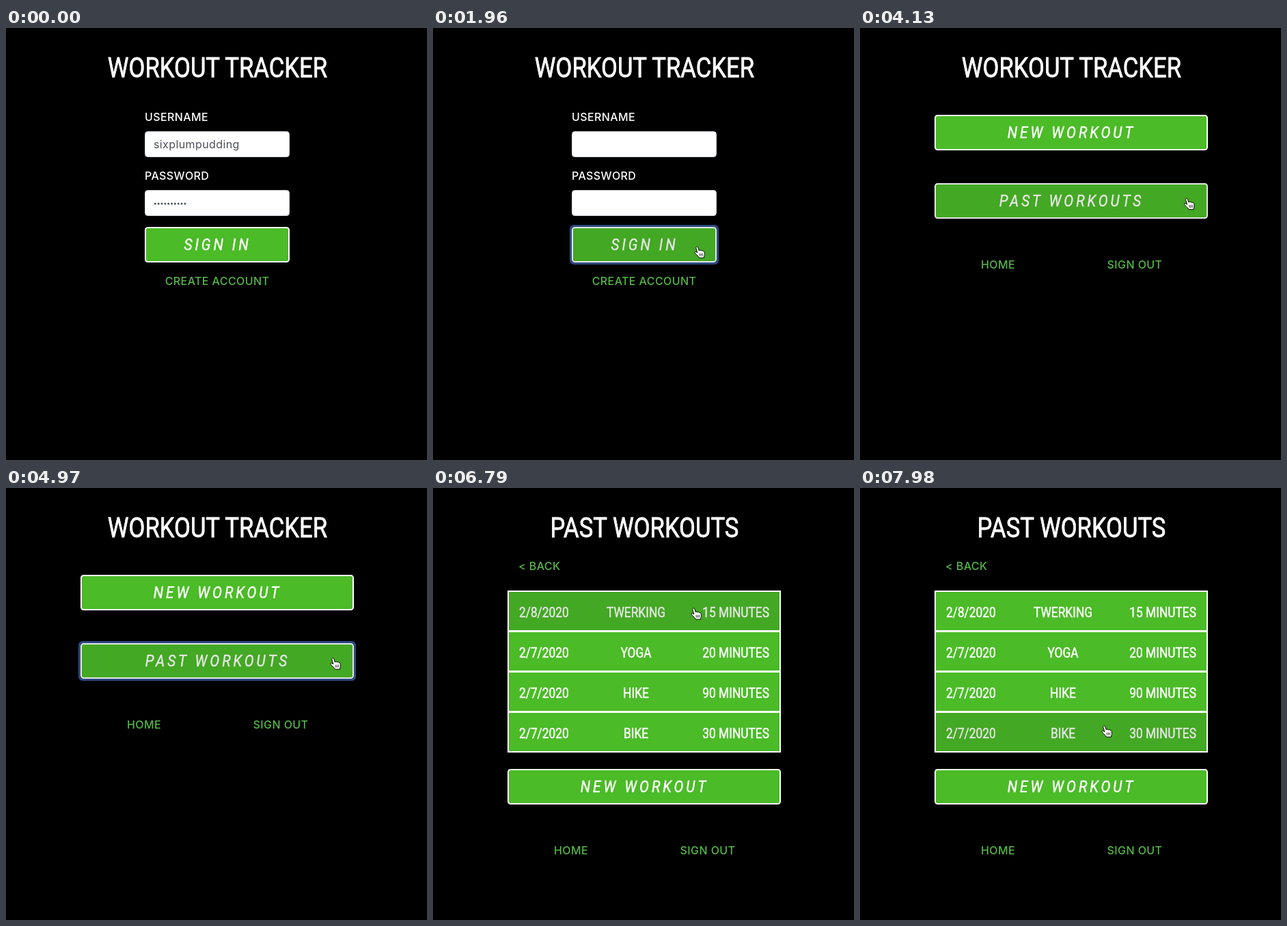
These frames come from a looping animation (616 px wide and 632 px high, 8000 ms). An HTML page:

```html
<!DOCTYPE html>
<html lang="en">
<head>
<meta charset="utf-8">
<title>Workout tracker</title>
<style>
  html, body { margin: 0; width: 100%; height: 100%; overflow: hidden; background: #000; }
  svg { display: block; width: 100vw; height: 100vh; }
  .cond { font-family: Roboto, sans-serif; fill: #fff; stroke: #fff; stroke-width: .5px; }
  .title { font-size: 40px; stroke-width: .8px; }
  .btn { font-size: 24px; font-style: italic; letter-spacing: 4.5px; }
  .cell { font-size: 20px; }
  .label, .link { font: 500 16px Inter, sans-serif; letter-spacing: .4px; }
  .label { fill: #fff; }
  .link { fill: #56b748; }
  .input { font: 16px Inter, sans-serif; fill: #495057; letter-spacing: .4px; }
</style>
</head>
<body>
<svg id="stage" viewBox="0 0 616 632" xmlns="http://www.w3.org/2000/svg"></svg>
<script>
const LOOP = 8000, STEP = 70;
const GREEN = '#4bbb27', RING = '#2d4b80';
const CLEAR = 1820, HOME = 2310, PAST = 5250;
const stage = document.getElementById('stage');

function el(parent, tag, attrs, text) {
  const node = document.createElementNS('http://www.w3.org/2000/svg', tag);
  for (const key in attrs) node.setAttribute(key, attrs[key]);
  if (text) node.textContent = text;
  parent.append(node);
  return node;
}

const show = (node, on) => node.setAttribute('visibility', on ? 'visible' : 'hidden');

function text(parent, cls, x, y, str, anchor = 'start') {
  return el(parent, 'text', { class: cls, x, y, 'text-anchor': anchor }, str);
}

// Roboto narrowed to the condensed proportions
function cond(parent, cls, x, y, str, anchor = 'middle') {
  return el(parent, 'text', {
    class: 'cond ' + cls, 'text-anchor': anchor,
    transform: `translate(${x} ${y}) scale(.867 1)`
  }, str);
}

function page(title) {
  const g = el(stage, 'g', {});
  cond(g, 'title', 309.5, 72, title);
  return { g, targets: [] };
}

function button(pg, x, y, w, str, clickAt = Infinity) {
  const ring = el(pg.g, 'rect', { x: x - 3, y: y - 3, width: w + 6, height: 58, rx: 6, fill: RING });
  el(pg.g, 'rect', { x, y, width: w, height: 52, rx: 4, fill: '#000' });
  const face = el(pg.g, 'g', {});
  el(face, 'rect', {
    x: x + 1, y: y + 1, width: w - 2, height: 50, rx: 3.5,
    fill: GREEN, stroke: '#fff', 'stroke-width': 2
  });
  cond(face, 'btn', x + w / 2 + .5, y + 33.6, str);
  pg.targets.push({ x, y, w, h: 52, face, ring, clickAt });
}

function links(pg, y) {
  text(pg.g, 'link', 202, y, 'HOME', 'middle');
  text(pg.g, 'link', 402, y, 'SIGN OUT', 'middle');
}

function field(pg, y, label) {
  text(pg.g, 'label', 203, y - 15, label);
  el(pg.g, 'rect', { x: 203.5, y: y + .5, width: 211, height: 37, rx: 4, fill: '#fff', stroke: '#ced4da' });
}

// Sign-in page
const login = page('WORKOUT TRACKER');
field(login, 151, 'USERNAME');
field(login, 237, 'PASSWORD');
const typed = el(login.g, 'g', {});
text(typed, 'input', 216, 176, 'sixplumpudding');
for (let i = 0; i < 10; i++) {
  el(typed, 'circle', { cx: 218.3 + i * 4.85, cy: 257, r: 1.5, fill: '#495057' });
}
button(login, 203, 291, 212, 'SIGN IN', 1610);
text(login.g, 'link', 309, 376, 'CREATE ACCOUNT', 'middle');

// Home page
const home = page('WORKOUT TRACKER');
button(home, 109, 127, 400, 'NEW WORKOUT');
button(home, 109, 227, 400, 'PAST WORKOUTS', 4550);
links(home, 352);

// List page
const past = page('PAST WORKOUTS');
text(past.g, 'link', 125, 120, '< BACK');
[
  ['2/8/2020', 'TWERKING', '15 MINUTES'],
  ['2/7/2020', 'YOGA', '20 MINUTES'],
  ['2/7/2020', 'HIKE', '90 MINUTES'],
  ['2/7/2020', 'BIKE', '30 MINUTES']
].forEach(([date, name, time], i) => {
  const y = 150 + i * 59;
  const face = el(past.g, 'g', {});
  el(face, 'rect', { x: 110, y: y + 1, width: 398, height: 59, fill: GREEN });
  cond(face, 'cell', 126, y + 39, date, 'start');
  cond(face, 'cell', 297, y + 39, name);
  cond(face, 'cell', 492, y + 39, time, 'end');
  past.targets.push({ x: 109, y, w: 400, h: 59, face });
});
el(past.g, 'path', {
  d: 'M110 151H508V386H110Z', fill: 'none', stroke: '#fff', 'stroke-width': 2
});
el(past.g, 'path', {
  d: 'M110 209.5H508M110 268.5H508M110 327.5H508', stroke: '#fff', 'stroke-width': 3
});
button(past, 109, 411, 400, 'NEW WORKOUT');
links(past, 536);

// Pointer, with its hot spot at 0,0
const pointer = el(stage, 'g', {});
const arrow = el(pointer, 'path', {
  d: 'M0 0V15.5L3.6 12.2L6 17.6L8.6 16.5L6.2 11.2H11Z',
  fill: '#000', stroke: '#fff', 'stroke-linejoin': 'round'
});
const hand = el(pointer, 'g', {
  transform: 'translate(-1.2 -.4)',
  stroke: '#000', 'stroke-linejoin': 'round', 'stroke-linecap': 'round'
});
el(hand, 'path', {
  d: 'M-1 1.2C-1.6-.8 1.4-1.6 2 .4L3.5 5.2C4.3 4 6.2 4.2 6.7 5.4C7.6 4.5 9 4.8 9.4 6' +
     'C10.6 5.6 11.3 6.4 11.4 7.6L11.6 11C11.6 12.6 10.8 13.2 10.6 15.6H3.6' +
     'C3.2 13.8 .4 12-1.6 9.6C-4 7.2-2.2 5.6-.4 7.2L.8 8Z',
  fill: '#fff'
});
el(hand, 'path', { d: 'M4.3 9.5L4.7 12.6M6.5 9.4L6.8 12.6M8.7 9.3L8.9 12.5', 'stroke-width': .8 });

// Time, x, y
const path = [
  [70, 443, 585], [350, 446, 530], [630, 452, 430], [840, 451, 372], [980, 430, 347],
  [1190, 396, 326], [1400, 387, 321], [3150, 387, 321], [3500, 428, 296], [3900, 471, 257],
  [4250, 479, 250], [5250, 479, 250], [5460, 482, 250], [5600, 482, 250], [5950, 534, 200],
  [6160, 534, 196], [6450, 425, 184], [6720, 382, 177], [7000, 382, 177], [7450, 374, 262],
  [7980, 358, 349]
];

function slope(i, k) {
  const a = path[i - 1], p = path[i], b = path[i + 1];
  if (!a || !b || (p[k] - a[k]) * (b[k] - p[k]) <= 0) return 0;
  return (b[k] - a[k]) / (b[0] - a[0]);
}

function along(t, k) {
  let i = 0;
  while (i < path.length - 2 && t >= path[i + 1][0]) i++;
  const a = path[i], b = path[i + 1], d = b[0] - a[0];
  const u = Math.min(1, Math.max(0, (t - a[0]) / d)), v = 1 - u;
  return v * v * (1 + 2 * u) * a[k] + u * u * (3 - 2 * u) * b[k]
    + d * u * v * (v * slope(i, k) - u * slope(i + 1, k));
}

function draw(t) {
  const current = t < HOME ? login : t < PAST ? home : past;
  for (const pg of [login, home, past]) pg.g.style.display = pg === current ? '' : 'none';
  show(typed, t < CLEAR);

  const x = along(t, 1), y = along(t, 2);
  // After a page change, hover waits for the next pointer move
  const stale = (t >= HOME && t < 3180) || (t >= PAST && t < 5620);
  let over = null;
  for (const target of current.targets) {
    const { x: left, y: top, w, h, face, ring, clickAt } = target;
    const hit = !stale && t >= STEP && x >= left && x < left + w && y >= top && y < top + h;
    if (hit) over = target;
    face.setAttribute('opacity', hit ? .9 : 1);
    if (ring) ring.style.display = t >= clickAt ? '' : 'none';
  }

  pointer.setAttribute('transform', `translate(${x.toFixed(2)} ${y.toFixed(2)})`);
  const pointing = stale || over !== null;
  show(hand, t >= STEP && pointing);
  show(arrow, t >= STEP && !pointing);
}

const start = performance.now();
function tick() {
  const t = (performance.now() - start) % LOOP;
  draw(Math.floor(t / STEP) * STEP);
  requestAnimationFrame(tick);
}
tick();
</script>
</body>
</html>
```
